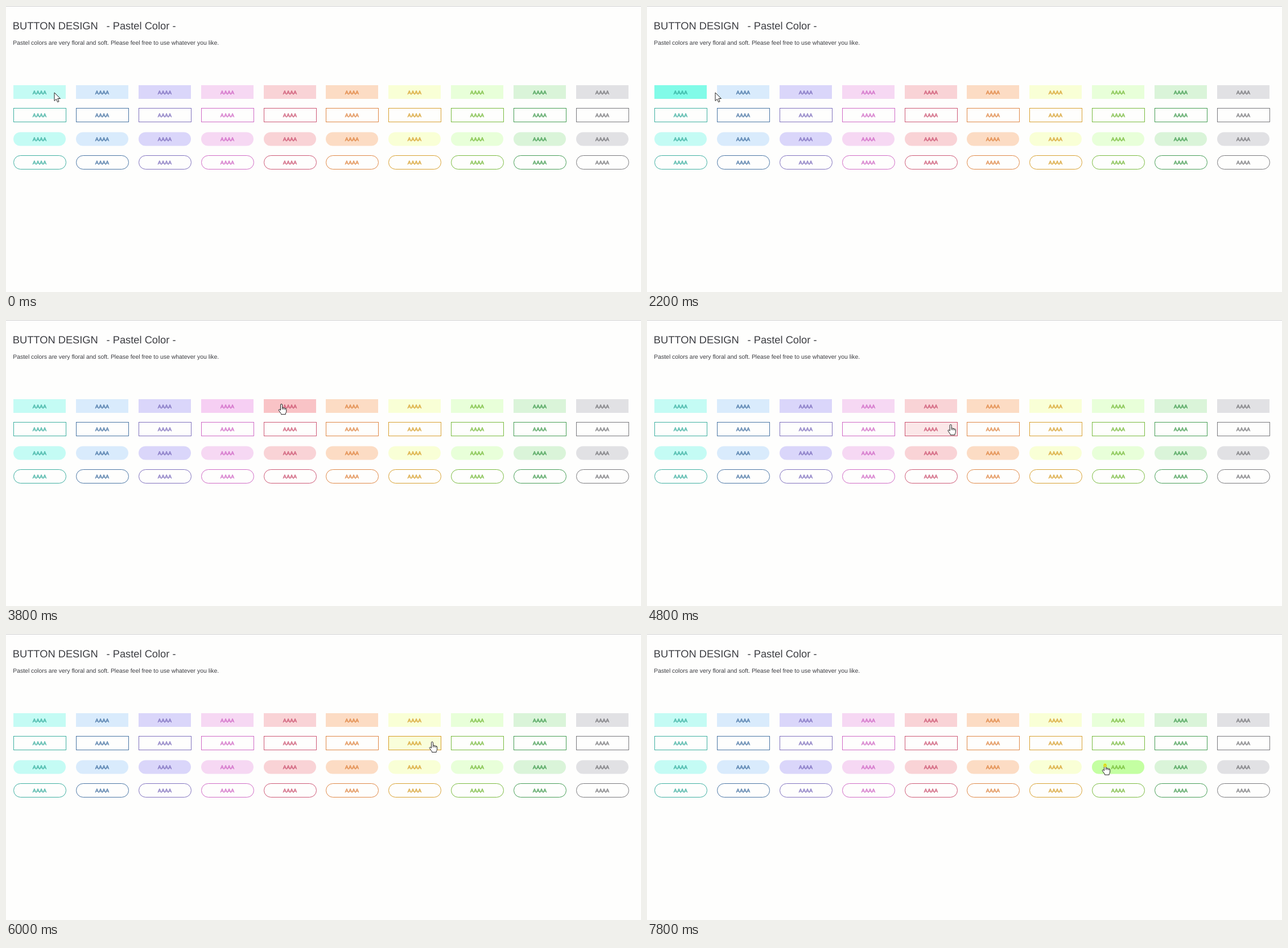
An HTML page that plays this animation: 1116x502 px, repeating every 8 s.

```html
<!DOCTYPE html>
<html lang="en">
<head>
<meta charset="utf-8">
<title>Pastel buttons</title>
<style>
  html, body { margin: 0; width: 100%; height: 100%; overflow: hidden; background: #fefefd; }
  svg { display: block; width: 1116px; height: 502px; }
  text {
    font-family: "Liberation Sans", Arial, sans-serif;
    fill: #3c3d42;
    text-rendering: geometricPrecision;
  }
  .title { font-size: 18.3px; }
  .intro { font-size: 10.45px; }
  .label { font-size: 9.17px; text-anchor: middle; stroke-width: .25; }
  #cursor path { fill: #fff; stroke: #222; stroke-linejoin: round; }
</style>
</head>
<body>
<svg viewBox="0 0 1116 502">
  <rect width="1116" height="1" fill="#d0d0d1"/>
  <text class="title" x="11.8" y="41">BUTTON DESIGN</text>
  <text class="title" x="176.6" y="41">- Pastel Color -</text>
  <text class="intro" x="12.2" y="67.6">Pastel colors are very floral and soft. Please feel free to use whatever you like.</text>
  <g id="buttons"></g>
  <g id="cursor">
    <path id="arrow" d="M0 0V14.5L3.4 11.4L5.6 16.6L8 15.6L5.8 10.5H10.4Z"/>
    <g id="hand">
      <path d="M-1.5 10.5V1Q-1.5-.5 0-.5T1.5 1V6Q3 5 4 6.5Q5.8 5.7 6.5 7.2Q8.5 6.7 8.7 8.5V12.5Q8.5 14.5 7.3 16V17.7H-.5V16.5L-4.5 10.8Q-5.2 9.5-4 8.9T-1.5 10.5Z"/>
      <path d="M1.5 6V9M4 6.5V9.3M6.5 7.2V9.6"/>
    </g>
    <ellipse id="press" cy="1" rx="3" ry="3.5" fill="#f2f000" opacity=".7"/>
  </g>
</svg>
<script>
const LOOP = 8000, STEP = 200, TICK = 10, FADE = 420, DEEPEN = 2.8;
const byId = id => document.getElementById(id);

// fill and ink of each column
const palette = [
  ['#c4fbf4', '#2ca898'], ['#d9ebfc', '#38689c'], ['#dad6fa', '#7464b8'],
  ['#f6d8f3', '#cc5cc0'], ['#f9d3d6', '#c84868'], ['#fcdcc4', '#dc7c34'],
  ['#f9ffd6', '#d4981c'], ['#e8ffd9', '#6cb42c'], ['#daf4d9', '#349444'],
  ['#e1e1e4', '#6c6c70']
];

// key points of the pointer: ms, x, y
const path = [
  [0, 85, 152], [2150, 85, 152], [2200, 120, 152], [2600, 188, 149],
  [3200, 342, 166], [3800, 484, 148], [4400, 524, 175], [5060, 540, 190],
  [5400, 626, 189], [6200, 790, 190], [6600, 811, 190], [6800, 817, 218],
  [LOOP - STEP, 805, 229.5], [LOOP, 805, 229.5]
];

function add(name, attributes, text = '') {
  const node = document.createElementNS('http://www.w3.org/2000/svg', name);
  for (const key in attributes) node.setAttribute(key, attributes[key]);
  node.textContent = text;
  return byId('buttons').appendChild(node);
}

// Saturate a colour while keeping its brightest channel.
function deepen(hex) {
  const channels = [1, 3, 5].map(i => parseInt(hex.slice(i, i + 2), 16));
  const max = Math.max(...channels);
  return `rgb(${channels.map(c => Math.round(max * (c / max) ** DEEPEN))})`;
}

function makeButton(column, row) {
  const [fill, ink] = palette[column];
  const outlined = row % 2 === 1;
  const x = Math.round(12.9 + 109.9 * column);
  const y = [139, 179, 221.5, 262][row];
  const width = outlined ? 93 : 92, height = outlined ? 25 : 24;
  const inset = outlined ? 0.5 : 0;
  const addBox = color => add('rect', {
    x: x + inset, y: y + inset, width: width - 2 * inset, height: height - 2 * inset,
    rx: row < 2 ? 0 : 12, fill: color, stroke: outlined ? ink : 'none', 'stroke-width': 0.9
  });
  addBox(outlined ? 'none' : fill);
  const glow = addBox(outlined ? fill : deepen(fill));
  add('text', { class: 'label', x: x + 46, y: y + 15.7, style: `fill:${ink};stroke:${ink}` }, 'AAAA');
  const contains = p => p.x >= x && p.x < x + width && p.y >= y && p.y < y + height;
  return { glow, contains, level: 0 };
}

const buttons = [0, 1, 2, 3].flatMap(row => palette.map((_, column) => makeButton(column, row)));

function pointerAt(t) {
  const next = path.findIndex(key => key[0] > t);
  const [t0, x0, y0] = path[next - 1], [t1, x1, y1] = path[next];
  const part = (t - t0) / (t1 - t0);
  return { x: x0 + (x1 - x0) * part, y: y0 + (y1 - y0) * part };
}

// Run the hover fades once and keep the state of every step.
const states = [];
for (let t = 0; t < LOOP; t += TICK) {
  const pointer = pointerAt(t);
  if (t % STEP === 0) {
    states.push({
      ...pointer,
      levels: buttons.map(b => b.level),
      pointing: buttons.some(b => b.level > 0 && b.contains(pointer))
    });
  }
  for (const b of buttons) {
    const change = (b.contains(pointer) ? TICK : -TICK) / FADE;
    b.level = Math.min(1, Math.max(0, b.level + change));
  }
}

const show = (id, on) => { byId(id).style.display = on ? '' : 'none'; };

function draw(time) {
  const index = Math.floor(time % LOOP / STEP);
  const { x, y, levels, pointing } = states[index];
  buttons.forEach((b, i) => b.glow.setAttribute('opacity', levels[i]));
  byId('cursor').setAttribute('transform', `translate(${x} ${y})`);
  show('arrow', !pointing);
  show('hand', pointing);
  show('press', index === states.length - 1);
}

const start = performance.now();
function tick() {
  draw(performance.now() - start);
  requestAnimationFrame(tick);
}
tick();
</script>
</body>
</html>
```
